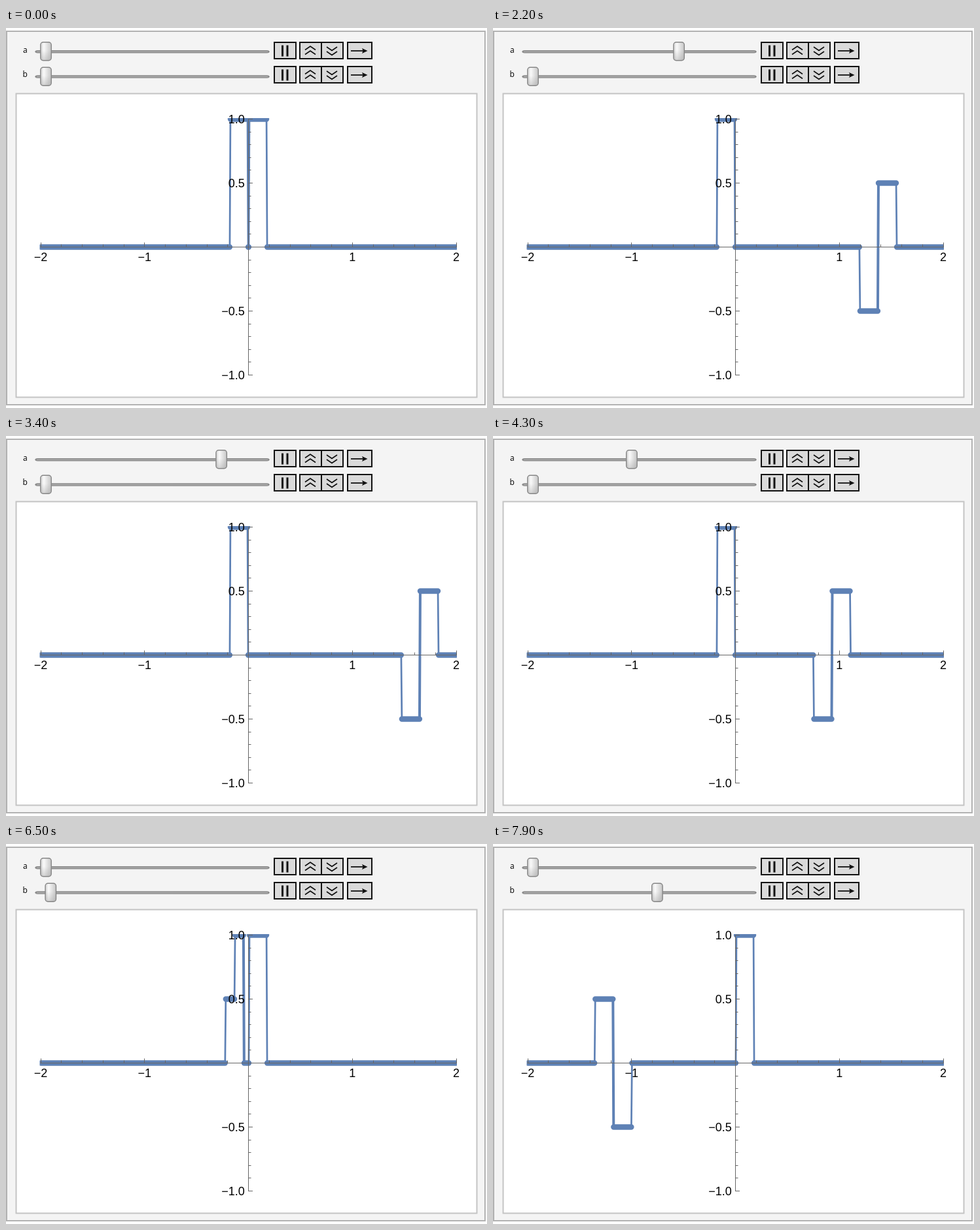
Recreate the animation shown at these times as an HTML page. Size 735 by 582 pixels, loop 8 s.

```html
<!DOCTYPE html>
<html lang="en">
<head>
<meta charset="utf-8">
<title>Two sliders and a step plot</title>
<style>
  html, body { margin: 0; width: 100%; height: 100%; overflow: hidden; background: #fff; }
  svg { display: block; }
  .name { font: 12px "Open Sans", "Noto Sans", sans-serif; }
  .num { font: 18px "Liberation Sans", Arial, sans-serif; }
</style>
</head>
<body>
<svg width="735" height="582" viewBox="0 0 735 582">
  <defs>
    <linearGradient id="knob">
      <stop offset="0" stop-color="#d2d2d2"/>
      <stop offset=".3" stop-color="#fafafa"/>
      <stop offset="1" stop-color="#c6c6c6"/>
    </linearGradient>
    <linearGradient id="shade" x2="0" y2="1">
      <stop offset=".45" stop-color="#999" stop-opacity="0"/>
      <stop offset="1" stop-color="#999" stop-opacity=".4"/>
    </linearGradient>
    <clipPath id="area"><rect x="51.5" y="138" width="637.5" height="395"/></clipPath>
    <g id="thumb">
      <rect x="-8.2" y="-14" width="16.4" height="28" rx="4" fill="url(#knob)"/>
      <rect x="-8.2" y="-14" width="16.4" height="28" rx="4" fill="url(#shade)" stroke="#858585" stroke-width="1.4"/>
    </g>
    <g id="row">
      <path d="M44 36.3Q45 34 48 34H399Q402 34 403 36.3Q402 38.5 399 38.5H48Q45 38.5 44 36.3Z" fill="#8c8c8c"/>
      <path d="M47 36.3H400" stroke="#aaa" stroke-width="1.6"/>
    </g>
    <g id="buttons">
      <path d="M410 22h33v25h-33zM449 22h66v25h-66zM482 22v25M522 22h37v25h-37z" fill="#dadada" stroke="#111" stroke-width="2"/>
      <path d="M422.5 26.5v17M430 26.5v17" stroke="#111" stroke-width="3"/>
      <path d="M457 33.5l8-5.5 8 5.5M457 40.5l8-5.5 8 5.5M490 29l8 5.5 8-5.5M490 36l8 5.5 8-5.5" fill="none" stroke="#111" stroke-width="1.7"/>
      <path d="M527 35h20" stroke="#111" stroke-width="1.8"/>
      <path d="M544 31l8.500 4-8.500 4 1.500-4z" fill="#111"/>
    </g>
  </defs>

  <rect x="1" y="5" width="731" height="572" fill="#f4f4f4" stroke="#b2b2b2" stroke-width="2"/>
  <rect x="15.500" y="100.500" width="704" height="465" fill="#fff" stroke="#c4c4c4" stroke-width="2"/>

  <text class="name" x="26" y="38">a</text>
  <text class="name" x="25.500" y="75">b</text>
  <use href="#row"/>
  <use href="#row" y="38.300"/>
  <use href="#buttons"/>
  <use href="#buttons" y="37"/>
  <use id="thumbA" href="#thumb"/>
  <use id="thumbB" href="#thumb"/>

  <g clip-path="url(#area)" fill="none" stroke="#5e81b5" stroke-linecap="round">
    <path id="thin" stroke-width="2.700"/>
    <path id="bold" stroke-width="4"/>
    <path id="flat" stroke-width="8.400"/>
  </g>
  <path id="axes" fill="none" stroke="#666"/>
  <g id="labels" class="num"></g>
</svg>
<script>
const $ = id => document.getElementById(id);
const px = x => 370.5 + 158.75 * x;
const py = y => 335.5 - 196 * y;
const HALF = 0.1768;   // half width of the starting pulse
const LOOP = 8000;

// [time, value], linear in between
const keysA = [[400, 0], [500, .004], [1300, .648], [2200, 1.373], [2972, 2],
               [3400, 1.65], [4300, .929], [5460, 0]];
const keysB = [[6400, 0], [6500, .045], [7900, 1.176]];

function valueAt(keys, t) {
  if (t <= keys[0][0]) return keys[0][1];
  for (let i = 1; i < keys.length; i++) {
    const [t0, v0] = keys[i - 1], [t1, v1] = keys[i];
    if (t <= t1) return v0 + (v1 - v0) * (t - t0) / (t1 - t0);
  }
  return keys[keys.length - 1][1];
}

// Odd pulse split into two travelling halves: a wave on a half line fixed at 0
const pulse = x => Math.abs(x) < HALF ? Math.sign(x) : 0;
const wave = (x, s) => (pulse(x - s) + pulse(x + s)) / 2;

function steps(a, b) {
  const eps = 1 / 158.75;
  const height = x => Math.abs(x) < eps ? 0 : x > 0 ? wave(x, a) : wave(-x, b);
  const edges = s => [s - HALF, s, s + HALF, HALF - s];
  const right = edges(a).filter(x => x > eps && x < 2);
  const left = edges(b).filter(x => x > eps && x < 2).map(x => -x);
  const cuts = [-2, ...left, -eps, eps, ...right, 2].sort((p, q) => p - q);
  const list = [];
  for (let i = 1; i < cuts.length; i++) {
    const from = cuts[i - 1], to = cuts[i];
    if (to - from < 1e-6) continue;
    const y = height((from + to) / 2), last = list[list.length - 1];
    if (last && last.y === y) last.to = to;
    else list.push({ from, to, y });
  }
  return list;
}

function drawCurve(a, b) {
  const list = steps(a, b);
  let flat = "", thin = "", bold = "";
  list.forEach((s, i) => {
    const x0 = px(s.from) + (i ? .5 : 0);
    const x1 = Math.max(x0 + .01, px(s.to) - (i < list.length - 1 ? .5 : 0));
    flat += `M${x0} ${py(s.y)}H${x1}`;
    const next = list[i + 1];
    if (!next) return;
    const line = `M${x1} ${py(s.y)}L${px(next.from) + .5} ${py(next.y)}`;
    // the middle of a moving pulse is a double jump
    const middle = [a, -b].some(c => Math.abs(c) > .01 && Math.abs(s.to - c) < 1e-6);
    if (middle) bold += line; else thin += line;
  });
  $("flat").setAttribute("d", flat);
  $("thin").setAttribute("d", thin);
  $("bold").setAttribute("d", bold);
}

function drawAxes() {
  let d = "M52 335.5H689M370.5 139V532";
  for (let i = -10; i <= 10; i++) {
    const x = Math.floor(px(i / 5)) + .5;
    if (i) d += `M${x} 335.5v${i % 5 ? -4 : -7}`;
    const y = Math.round(py(i / 10) - .5) + .5;
    if (i) d += `M370.5 ${y}h${i % 5 ? 4 : 6.5}`;
  }
  $("axes").setAttribute("d", d);
  const label = (text, x, y, anchor) =>
    `<text x="${x}" y="${y}" text-anchor="${anchor}">${text.replace("-", "\u2212")}</text>`;
  $("labels").innerHTML =
    [-2, -1, 1, 2].map(v => label(String(v), px(v), 357, "middle")).join("") +
    [-1, -.5, .5, 1].map(v => label(v.toFixed(1), 364.8, py(v) + 6, "end")).join("");
}

function draw(time) {
  const t = Math.floor(time % LOOP / 100) * 100;
  const a = valueAt(keysA, t), b = valueAt(keysB, t);
  $("thumbA").setAttribute("transform", `translate(${61 + 162.5 * a} 35.7)`);
  $("thumbB").setAttribute("transform", `translate(${61 + 161.5 * b} 74.3)`);
  drawCurve(a, b);
}

drawAxes();
draw(0);
let start;
requestAnimationFrame(function tick(now) {
  start ??= now;
  draw(now - start);
  requestAnimationFrame(tick);
});
</script>
</body>
</html>
```
